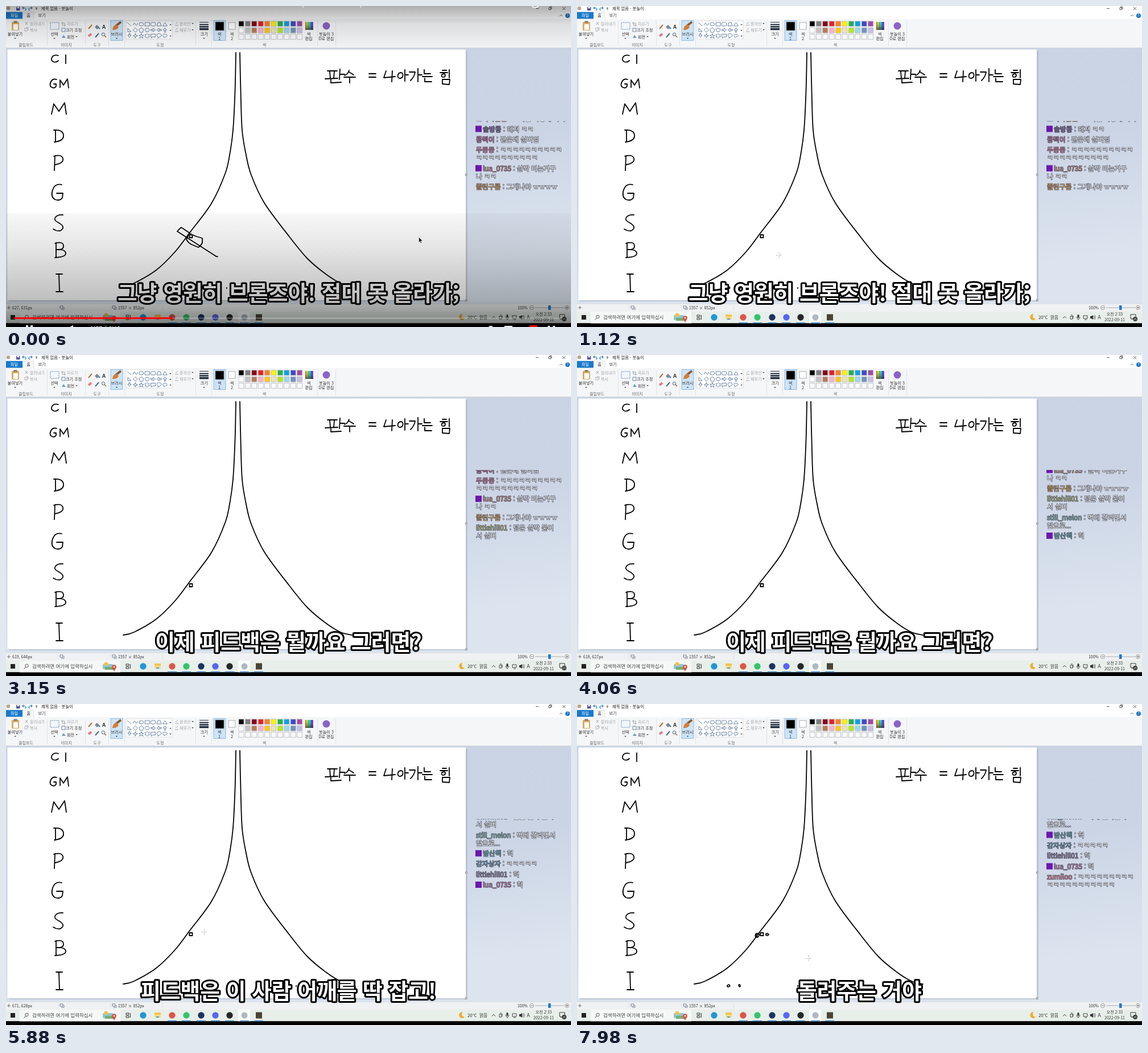
Write an HTML page that moves like this. It is 993 px wide and 564 px high and loops after 8000 ms.

```html
<!DOCTYPE html>
<html lang="ko">
<head>
<meta charset="utf-8">
<style>
html, body { margin: 0; width: 100%; height: 100%; overflow: hidden; background: #000; }
svg { display: block; width: 100%; height: 100%; }
text { font-family: "Noto Sans CJK KR", "Noto Sans CJK", sans-serif; white-space: pre; }
.ink path { fill: none; stroke: #000; stroke-width: 1.8; stroke-linecap: round; stroke-linejoin: round; }
.chat text { font-size: 11.8px; fill: #fff; stroke: #4a4d58; stroke-width: 1.5; stroke-linejoin: round; paint-order: stroke; }
.chat .name { font-weight: 500; }
#caption { font-size: 37.8px; font-weight: 900; fill: #fff; stroke: #000; stroke-width: 6; stroke-linejoin: round; paint-order: stroke; }
</style>
</head>
<body>
<svg id="stage" viewBox="0 0 993 564"></svg>
<script>
const LOOP = 8000, STEP = 70;
const rect = (x, y, w, h, fill, extra = '') => `<rect x="${x}" y="${y}" width="${w}" height="${h}" fill="${fill}" ${extra}/>`;
const dot = (x, y, r, fill, extra = '') => `<circle cx="${x}" cy="${y}" r="${r}" fill="${fill}" ${extra}/>`;
const line = (d, color = '#555', width = 1, extra = '') => `<path d="${d}" fill="none" stroke="${color}" stroke-width="${width}" ${extra}/>`;
const shape = (d, fill) => `<path d="${d}" fill="${fill}"/>`;
// y is the optical middle of the text
const label = (s, x, y, size = 7.2, fill = '#333', anchor = 'middle', extra = '') =>
  `<text x="${x}" y="${y + size * .36}" font-size="${size}" fill="${fill}" text-anchor="${anchor}" ${extra}>${s}</text>`;
const left = (s, x, y, size, fill) => label(s, x, y, size, fill, 'start');
const caret = (x, y) => shape(`M${x - 1.8} ${y - 1}h3.6l-1.8 2z`, '#444');
const outline = color => `stroke="${color}" stroke-width=".8"`;

function smooth(pts) {
  let d = `M${pts[0]}`;
  for (let i = 0; i < pts.length - 1; i++) {
    const a = pts[i - 1] || pts[i], b = pts[i], c = pts[i + 1], e = pts[i + 2] || c;
    const h1 = b.map((v, k) => v + (c[k] - a[k]) / 6), h2 = c.map((v, k) => v - (e[k] - b[k]) / 6);
    d += `C${h1} ${h2} ${c}`;
  }
  return d;
}

function titleBar() {
  return rect(0, 0, 993, 23, '#fff') +
    dot(4, 4, 3.3, '#b9a68c') +
    rect(18, 1.5, 6.5, 6.5, '#5a55a8') + rect(19.5, 1.5, 3.5, 2.5, '#fff') +
    line('M29 3.5h4a2 2 0 0 1 0 4M31 1.5l-2 2 2 2', '#2c7fc8', 1.2) +
    line('M46 3.5h-4a2 2 0 0 0 0 4M44 1.5l2 2-2 2', '#2c7fc8', 1.2) +
    line('M52 3h3') + caret(53.5, 5.5) +
    left('제목 없음 - 붓놀이', 62, 4.3, 7.3, '#222') +
    line('M931 4.5h5M954 3h3.5v3.5h-3.5zM955.5 3v-1.5h3.5v3.5h-1.5M978 2l5 5M983 2l-5 5', '#333', .8) +
    rect(0, 10.5, 29, 12, '#1979ca') + label('파일', 14.5, 16.5, 7.2, '#fff') +
    rect(30, 10.5, 19, 13, '#f5f6f7', outline('#dadbdc')) + label('홈', 39.5, 16.5) + label('보기', 63, 16.5) +
    line('M973 18l2.5-2.5 2.5 2.5', '#666') + dot(987, 17, 4, '#1979ca') + label('?', 987, 17, 6.5, '#fff');
}

function shapeGallery() {
  const forms = ['M-4-3l7 6', 'M-4 2q2-7 4-2t4-2', 'M-4 0a4 3 0 1 0 8 0a4 3 0 1 0-8 0', 'M-4-3h8v6h-8z',
    'M-3-3h6l1 1v4l-1 1h-6l-1-1v-4z', 'M-4 3l2-6h4l2 6z', 'M-4 3l4-6 4 6z', 'M-3-3v6h6z', 'M0-4l4 4-4 4-4-4z',
    'M0-4l4 3-1.5 5h-5l-1.5-5z', 'M-2-3h4l2 3-2 3h-4l-2-3z', 'M-4-1h4v-2l4 3-4 3v-2h-4z',
    'M4-1h-4v-2l-4 3 4 3v-2h4z', 'M-1 4v-4h-2l3-4 3 4h-2v4z', 'M-1-4h2v3h2l-3 4-3-4h2z',
    'M0-4l1 3 3 1-3 1-1 3-1-3-3-1 3-1z', 'M0-4l1 3h3l-2 2 1 3-3-2-3 2 1-3-2-2h3z', 'M0-4l2 2h2l-1 2 1 2h-2l-2 2-2-2h-2l1-2-1-2h2z',
    'M-4-3h8v5h-5l-2 2v-2h-1z', 'M-4-1a4 3 0 1 1 5 3l-3 2v-2z', 'M-4-1a4 2.5 0 1 1 5 3l-3 1z'];
  return rect(211, 26, 81, 32, '#fff', outline('#d5d8dc')) +
    forms.map((d, i) => line(d, '#41628f', .8, `transform="translate(${217 + i % 7 * 10.4} ${32 + Math.floor(i / 7) * 10.2})"`)).join('') +
    caret(289, 33) + caret(289, 43) + caret(289, 53);
}

function palette() {
  const colors = ('#000 #7f7f7f #880015 #ed1c24 #ff7f27 #fff200 #22b14c #00a2e8 #3f48cc #a349a4 ' +
    '#fff #c3c3c3 #b97a57 #ffaec9 #ffc90e #efe4b0 #b5e61d #99d9ea #7092be #c8bfe7').split(' ');
  return Array.from({ length: 30 }, (_, i) =>
    rect(409 + i % 10 * 11.4, 26.8 + Math.floor(i / 10) * 11.4, 9, 9, colors[i] || '#f8f9fa', outline('#b5b8bc'))).join('');
}

function ribbon() {
  const gray = '#a2a5a8';
  const selected = x => rect(x, 25.5, 21, 35, '#cde4f7', outline('#76b0e0'));
  return rect(0, 23, 993, 51, '#f5f6f7') + rect(0, 73, 993, 1, '#d5d8dd') +
    [72, 139, 180, 208, 333, 361, 547, 579].map(x => rect(x, 26, .8, 45, '#dcdee0')).join('') +
    rect(10, 28, 13, 15, '#d9ad62', 'rx="1"') + rect(13.5, 26.5, 6, 3, '#777') + rect(13, 32, 8, 10, '#fff') +
    label('붙여넣기', 16, 49) + caret(16, 57) +
    line('M34 28l4 5M38 28l-4 5', gray) + left('잘라내기', 42, 31, 7, gray) +
    line('M33 39h4v5h-4zM35 38h4v5', gray, .8) + left('복사', 42, 42, 7, gray) + label('클립보드', 35, 68, 7, '#666') +
    rect(78, 29, 15, 12, '#f2f7fc', 'stroke="#6c8db3" stroke-dasharray="2 1"') + label('선택', 85, 49) + caret(85, 57) +
    line('M99 28v6h6M97 30h6v6', gray) + left('자르기', 107, 31, 7, gray) +
    line('M98 39h6v6h-6z', '#6a87ad') + left('크기 조정', 105, 42) +
    shape('M98 56l3-5 4 5z', '#6b9bd0') + left('회전', 107, 54) + caret(124, 54) + label('이미지', 106, 68, 7, '#666') +
    line('M145 40l6-7', '#b5713a', 2) + shape('M156 37l4-4 4 4-4 4z', '#7c8794') + dot(164, 39, 1.5, '#2884cf') +
    label('A', 172, 37, 9.5, '#333', 'middle', 'font-weight="700"') +
    line('M145 53l5-4', '#e07a80', 4) + line('M157 55l6-7', '#4d6885', 2) + dot(171, 50, 2.8, '#dff0fb', outline('#456')) + line('M173 52l3 3', '#a36b35', 1.5) +
    label('도구', 160, 68, 7, '#666') +
    selected(184) + line('M202 28l-9 7', '#8e5a2d', 4) + shape('M187 42q1-9 8-9l3 4q-3 6-11 5z', '#d97c33') + label('브러시', 194.5, 49) + caret(194.5, 57) +
    shapeGallery() + label('도형', 271, 68, 7, '#666') +
    line('M297 34h6M298 32l4-4', gray) + left('윤곽선', 305, 31, 7, gray) + caret(328, 31) +
    line('M297 45h6M298 42l4-3', gray) + left('채우기', 305, 42, 7, gray) + caret(328, 42) +
    [1, 2, 2.5, 3.5].map((h, i) => rect(340, 28 + i * 3.6, 16, h, '#1e2b3e')).join('') +
    label('크기', 348, 49) + caret(348, 57) +
    selected(365) + rect(368, 28, 15, 15, '#000', outline('#888')) + label('색', 375, 49) + label('1', 375, 57) +
    rect(391, 29, 12, 12, '#fff', outline('#999')) + label('색', 397, 49) + label('2', 397, 57) +
    palette() + rect(526, 28, 14, 14, 'url(#hues)') + rect(526, 28, 14, 14, 'url(#shade)') +
    label('색', 532, 49) + label('편집', 532, 57) + label('색', 454, 68, 7, '#666') +
    dot(563, 35, 6.5, '#8a63c8') + label('붓놀이 3', 563, 49) + label('D로 편집', 563, 57);
}

const letters = [
  'M92 87q-8-2-11 3t2 8q5 2 9-2M105 86v15',
  'M89 129q-7-2-10 4t0 9q6 4 9-1v-4h-4M95 143v-13l6 9 7-11 2 16',
  'M80 190l4-18 9 13 10-15 3 20',
  'M87 218v21M84 218q16-1 17 9t-16 12',
  'M86 263l-1 26M84 264q14-4 16 4t-14 11',
  'M98 314q-12-3-16 9t4 17q9 3 13-3l1-8h-11',
  'M100 367q-9-1-13 4t4 9 9 8-5 7q-6 1-12-3',
  'M88 416v26M86 417q14-4 15 4t-13 7q16-1 17 6t-19 8',
  'M88 471h11M93 471l1 30M88 502h12'];

const note = ['M565 114h17M569 115l1 12M577 115l-1 12M561 128l22-1M587 111l-1 18M587 120h8M571 129v6l18-1',
  'M603 113q-2 7-8 9M603 116l8 5M594 125h20M604 125v10', 'M638 119h12M638 125h12',
  'M668 114l-4 12 20-2M679 114l-1 19', 'M694 117c-7 1-7 11-1 10s6-10 1-10M701 112v20M701 121h6',
  'M709 116h10q-1 8-8 15M724 110v23M724 121h7', 'M735 112v7h11M732 124h17M736 127v6h12',
  'M767 113h7M763 117h13M769 119c-5 1-4 7 0 6s4-6 0-6M779 112v14M767 129h13l-1 9-12-1z'];

const leftWall = [[404, 82], [402.5, 150], [399, 218], [393, 262], [385, 295], [361, 347], [323, 398], [297, 432], [264, 464], [225, 487], [206, 492]];
const rightWall = [[411, 82], [412.5, 150], [415, 218], [422, 262], [431, 297], [454, 346], [497, 404], [530, 444], [562, 471], [588, 487], [608, 492]];
const specks = 'M322.5 402h5v5h-5zM323 402l-1 4M264 495q2-3 4-1t-2 3q-2 0-2-2M285 493q-2 2 1 4 2-1 0-4' +
  'M388 495v1M493 496h1M510 495v1M523 495v1';

// Ink that comes and goes: start, end of drawing, removal
const strokes = [
  { d: 'M301 396l67 43q2 2 4 1', from: -1, done: -1, gone: 420 },
  { d: 'M323 400q10 5 22 8v8q-3 6-7 8l-12-5q-6-3-9-9l2-4', from: -1, done: -1, gone: 560 },
  { d: 'M301 396q2-3 7-7l15 10-5 8', from: -1, done: -1, gone: 700 },
  { d: 'M326 395l-21 21 16-14-10 7 9-8-8 6', from: 2170, done: 2560, gone: 3150 },
  { d: 'M332 404q3-2 5 1 -2 3-5 1z', from: 6860, done: 7070, gone: LOOP },
  { d: 'M315 403q-4 6 1 7 5-1 4-6 -3-2-6 1l3 4', from: 7210, done: 7490, gone: LOOP }];

function drawing() {
  const ink = [...letters, ...note, smooth(leftWall), smooth(rightWall), specks];
  const handle = y => rect(807.5, y, 2.5, 2.5, '#fff', outline('#777'));
  return rect(0, 74, 993, 449, 'url(#desk)') +
    rect(808, 79, 3, 439, '#aab5c8', 'opacity=".6"') + rect(5, 517, 805, 2, '#aab5c8', 'opacity=".6"') +
    rect(2.5, 76.5, 805.5, 440.5, '#fff') + handle(295) + handle(516) +
    `<g class="ink">${ink.map(d => `<path d="${d}"/>`).join('')}
     ${strokes.map(s => `<path class="stroke" pathLength="1" stroke-dasharray="1 2" d="${s.d}"/>`).join('')}</g>`;
}

function statusBar() {
  return rect(0, 523, 993, 14, '#f0f1f2') + rect(0, 523, 993, .8, '#d9dce0') +
    [91, 183, 275].map(x => rect(x, 525, .8, 10, '#dcdee0')).join('') +
    line('M2 530h6M5 527v6', '#555', .8) + '<text id="coords" x="11" y="532.5" font-size="7" fill="#333"></text>' +
    [95, 187].map(x => line(`M${x} 527h5v4h-5zm2 6h5v-4`, '#567', .8)).join('') +
    left('1557 × 852px', 197, 530, 7) + label('100%', 908, 530, 7) +
    dot(924, 530, 3.5, '#fff', outline('#777')) + line('M922 530h4', '#444', .8) +
    rect(930, 529.6, 51, .8, '#999') + rect(953, 526, 4.5, 8, '#1979ca') +
    dot(986, 530, 3.5, '#fff', outline('#777')) + line('M984 530h4M986 528v4', '#444', .8);
}

function taskbar() {
  const apps = [[241, '#2496d4'], [292, '#de5548'], [317, '#35c46b'], [343, '#1c3260'], [368, '#5865f2'], [393, '#26272b']];
  return rect(0, 537, 993, 20.5, '#e8efea') + rect(0, 557.5, 993, 6.5, '#000') +
    rect(8, 543, 8, 8, '#222') + rect(24, 537, 177, 20.5, '#f5f8f6') +
    dot(36.5, 546, 2.8, 'none', outline('#333')) + line('M34.5 548.5l-3 3', '#333') +
    left('검색하려면 여기에 입력하십시', 46, 547, 8.5, '#444') +
    rect(170, 543, 18, 9, '#8ec7d8', 'rx="2"') + dot(176, 543, 3.5, '#f1c24b') + rect(174, 548, 16, 5, '#74ae73') +
    shape('M187 550h6l-3 6z', '#d94c38') + dot(190, 548, 3.8, '#d94c38') + dot(190, 548, 1.4, '#fff') +
    line('M211 543h5v3h-5zM211 548h5v3h-5zM218.5 543v8', '#333') +
    rect(261, 542, 11, 9, '#f4c44e', 'rx="1"') + rect(261, 546, 11, 5, '#f9dc84') + rect(264, 549, 5, 2, '#4b97d2') +
    rect(408, 537, 21, 20.5, '#fff', 'opacity=".8"') +
    apps.map(([x, c]) => dot(x, 547, 5.7, c)).join('') + dot(419, 547, 5.5, '#aeb9c3') + rect(439, 541.5, 11, 11, '#4b4335') +
    [292, 317, 343, 368, 393, 419, 444].map(x => rect(x - 8, 556, 16, 1.5, '#3685c6')).join('') +
    shape('M802 541a5.500 5.500 0 1 0 4 9q-7-2-4-9z', '#f0ae2c') + left('20°C&#160; 맑음', 811, 547, 7.8) +
    line('M854 548.5l3-3 3 3', '#333') + line('M867 545h4v5h-4zM868 543h3M872 544v5', '#333', .9) +
    rect(879.5, 542, 3, 6, '#333', 'rx="1.5"') + line('M878 546q0 4 3 4t3-4M881 550v2', '#333', .8) +
    line('M890 544h7v5h-7zM892 551h4', '#333', .9) + shape('M902 545h2l3-2v8l-3-2h-2z', '#333') + line('M908 544q2 3 0 6M910 543q2 4 0 8', '#333', .7) +
    label('A', 918, 547, 9) + label('오전 2:33', 945, 541.5, 7) + label('2022-09-11', 945, 551.5, 7) +
    line('M973 542h9v7h-5l-2 2v-2h-2z', '#333') + dot(981, 550, 4, '#333') + label('25', 981, 550, 5, '#fff');
}

// arrival, name, name color, badge, first line, second line
const messages = [
  [-1, '보리차한잔', '#a88a5f', 0, '그러면 어떻게 가나'],
  [-1, '솔방콩', '#80669a', 1, '헤져 ㅋㅋ'],
  [-1, '콩떡이', '#bd6c9e', 0, '같은데 실버임'],
  [-1, '두둥둥', '#d87fa6', 0, 'ㅋㅋㅋㅋㅋㅋㅋㅋㅋㅋ', 'ㅋㅋㅋㅋㅋㅋㅋㅋㅋㅋ'],
  [-1, 'lua_0735', '#c2877c', 1, '살짝 미는거구', '나 ㅋㅋ'],
  [-1, '졸린구름', '#dfa65c', 0, '그게나야 ㅠㅠㅠㅠ'],
  [2870, 'littlehill01', '#adb07a', 0, '팀운 살짝 묻어', '서 실버'],
  [3220, 'still_melon', '#80adaa', 0, '벽에 갈리면서', '앞으로...'],
  [3710, '밤산책', '#66a3b0', 1, '헉'],
  [4340, '감자상자', '#6b97b0', 0, 'ㅋㅋㅋㅋㅋ'],
  [4620, 'littlehill01', '#86769a', 0, '헉'],
  [5880, 'lua_0735', '#ba78a6', 1, '헉'],
  [7350, 'zumiloo', '#d67c90', 0, 'ㅋㅋㅋㅋㅋㅋㅋㅋㅋ', 'ㅋㅋㅋㅋㅋㅋㅋㅋㅋㅋㅋ']];
const bottoms = [];

function chat() {
  let y = 0;
  const rows = messages.map(([, name, color, badge, first, second]) => {
    y += 18.4;
    let row = (badge ? rect(825, y - 6, 11, 11, '#6b16b0') : '') +
      `<text x="${badge ? 838 : 826}" y="${y + 4.3}"><tspan class="name" fill="${color}">${name}</tspan> : ${first}</text>`;
    if (second) row += `<text x="826" y="${(y += 14) + 4.3}">${second}</text>`;
    bottoms.push(y);
    return `<g class="row">${row}</g>`;
  });
  return `<g class="chat" clip-path="url(#chatBox)"><g id="feed">${rows.join('')}</g></g>`;
}

function playerControls() {
  return '<g id="player">' + rect(0, 0, 993, 80, 'url(#topFade)') + rect(0, 364, 993, 200, 'url(#bottomFade)') +
    dot(930, -3, 6, 'none', 'stroke="#fff" stroke-width="1.5"') + left('(', 519, -4, 14, '#fff') + left(')', 622, -4, 14, '#fff') +
    rect(15, 547, 963, 3, '#fff', 'opacity=".2"') + rect(15, 547, 278, 3, '#f00') +
    rect(35, 561, 4, 3, '#fff') + rect(43, 561, 4, 3, '#fff') + shape('M112 564l6-3v3z', '#fff') + left('1:57 / 6:42', 148, 567, 11, '#fff') +
    dot(852, 567, 5, '#fff') + rect(876, 562, 14, 2, '#fff') + rect(920, 561, 14, 3, '#f00') + rect(952, 562, 4, 2, '#fff') + rect(961, 562, 4, 2, '#fff') +
    '<path d="M725.5 406v9.5l2.200-2 1.5 3.300 1.5-.7-1.5-3.200h3z" fill="#111" stroke="#fff" stroke-width=".6"/></g>';
}

const gradient = (id, dir, stops) => `<linearGradient id="${id}" ${dir}>${stops.map(([o, c, a = 1]) =>
  `<stop offset="${o}" stop-color="${c}" stop-opacity="${a}"/>`).join('')}</linearGradient>`;
const down = 'x2="0" y2="1"';

document.getElementById('stage').innerHTML = '<defs>' +
  gradient('desk', 'x2=".3" y2="1"', [[0, '#c9d3e4'], [.55, '#cbd4e5'], [1, '#dce4ef']]) +
  gradient('hues', '', [[0, '#f22'], [.2, '#fe2'], [.4, '#2d4'], [.6, '#2de'], [.8, '#33f'], [1, '#f2c']]) +
  gradient('shade', down, [[0, '#888', 0], [1, '#222', .7]]) +
  gradient('topFade', down, [[0, '#000', .32], [.4, '#000', .1], [1, '#000', 0]]) +
  gradient('bottomFade', down, [[0, '#000', .03], [.3, '#000', .1], [.75, '#000', .25], [.9, '#000', .38], [1, '#000', .5]]) +
  '<clipPath id="chatBox"><rect x="815" y="202" width="178" height="130"/></clipPath></defs>' +
  titleBar() + ribbon() + drawing() + statusBar() + taskbar() + chat() +
  `<g id="cross">${line('M-5 0h3.5M1.5 0h3.5M0-5v3.5M0 1.5v3.5', '#777', .9, 'stroke-dasharray="1 .8"')}${dot(0, 0, .5, '#777')}</g>` +
  '<text id="caption" x="496.5" y="518" text-anchor="middle"></text>' + playerControls();

const captions = [[0, '그냥 영원히 브론즈야! 절대 못 올라가;'], [1750, '벽에 막혔잖아'], [3150, '이제 피드백은 뭘까요 그러면?'],
  [4410, '피드백은 이 사람 어깨를 딱 잡고!'], [7140, '돌려주는 거야']];

const route = [[0, 326, 402], [400, 326, 402], [770, 355, 438], [1330, 355, 438], [1750, 325, 396], [2170, 326, 395], [2400, 306, 415],
  [2590, 318.7, 401], [3000, 324, 409], [3500, 314, 408], [4060, 321.3, 400], [4410, 322, 401], [4830, 347.2, 397.4],
  [5400, 339, 408], [5950, 349, 400], [6500, 331.1, 403.1], [6860, 331.1, 403.1], [7070, 335, 405], [7210, 316, 403],
  [7490, 318, 408], [7910, 407, 447], [LOOP, 407, 447]];

function cursorAt(t) {
  const i = route.findIndex(p => p[0] > t), a = route[i - 1], b = route[i];
  const u = (t - a[0]) / (b[0] - a[0]), k = u * u * (3 - 2 * u);
  return [a[1] + (b[1] - a[1]) * k, a[2] + (b[2] - a[2]) * k];
}

function coordsText(t, x, y) {
  if ((t >= 770 && t < 1400) || t >= 7560) return '';
  const px = Math.round((x - 1.8) / .517), py = Math.round((y - 75.8) / .517);
  return t >= 2170 && t < 2800 ? `${px},` : `${px}, ${py}px`;
}

const [cross, coords, caption, feed, player] = ['cross', 'coords', 'caption', 'feed', 'player'].map(id => document.getElementById(id));
const strokeNodes = document.querySelectorAll('.stroke'), rowNodes = document.querySelectorAll('.row');
const lastBefore = (table, t) => table.filter(row => row[0] <= t).length - 1;

function render(t) {
  const [x, y] = cursorAt(t);
  cross.setAttribute('transform', `translate(${x} ${y})`);
  coords.textContent = coordsText(t, x, y);
  caption.textContent = captions[lastBefore(captions, t)][1];
  player.setAttribute('opacity', Math.max(0, 1 - t / 280));
  strokes.forEach((s, i) => {
    const drawn = s.done < 0 ? 1 : Math.min(1, (t - s.from) / (s.done - s.from));
    strokeNodes[i].style.visibility = t > s.from && t < s.gone ? 'visible' : 'hidden';
    strokeNodes[i].setAttribute('stroke-dashoffset', 1 - Math.max(0, drawn));
  });
  const last = lastBefore(messages, t);
  feed.setAttribute('transform', `translate(0 ${318 - bottoms[last]})`);
  rowNodes.forEach((row, i) => row.style.visibility = i <= last ? 'visible' : 'hidden');
}

const start = performance.now();
function tick() {
  const t = (performance.now() - start) % LOOP;
  render(Math.floor(t / STEP) * STEP);
  requestAnimationFrame(tick);
}
tick();
</script>
</body>
</html>
```
